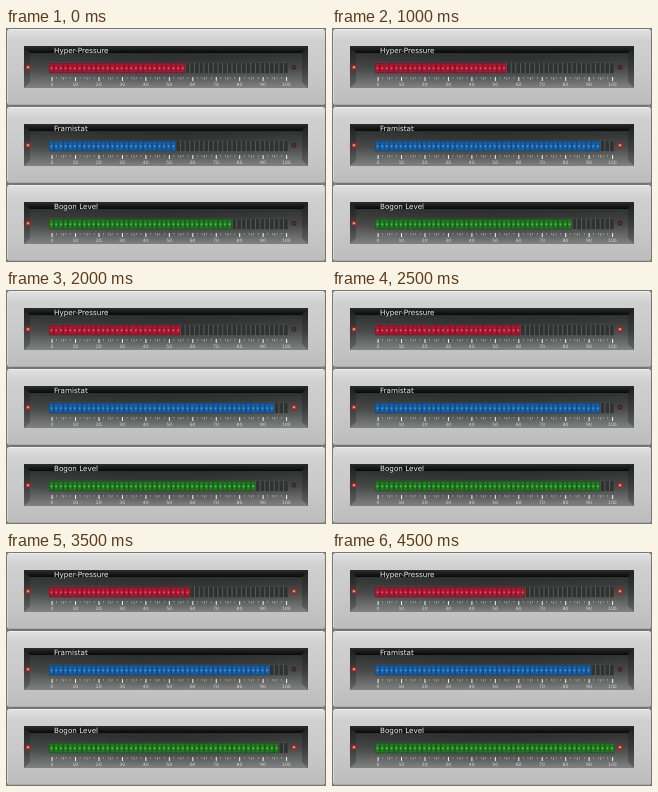
Animation, 320 px wide and 234 px high, one loop 5 s. Source, as an HTML page:

```html
<!DOCTYPE html>
<html>
<head>
<meta charset="utf-8">
<style>
html, body { margin: 0; width: 100%; height: 100%; overflow: hidden; background: #777; }
svg { display: block; width: 320px; height: 234px; }
text { font-family: "DejaVu Sans", sans-serif; }
</style>
</head>
<body>
<svg id="stage" viewBox="0 0 320 234" xmlns="http://www.w3.org/2000/svg">
  <defs>
    <linearGradient id="metal" x2="0" y2="1">
      <stop offset="0" stop-color="#e2e2e2"/>
      <stop offset=".16" stop-color="#d0d0d0"/>
      <stop offset=".6" stop-color="#c8c8c8"/>
      <stop offset="1" stop-color="#bcbcbc"/>
    </linearGradient>
    <linearGradient id="well" x2="0" y2="1">
      <stop offset="0" stop-color="#222423"/>
      <stop offset=".2" stop-color="#323433"/>
      <stop offset=".55" stop-color="#4a4c4b"/>
      <stop offset="1" stop-color="#808281"/>
    </linearGradient>
    <linearGradient id="lip" x2="0" y2="1">
      <stop offset="0" stop-color="#2c2e2d"/>
      <stop offset="1" stop-color="#080908"/>
    </linearGradient>
    <radialGradient id="shade">
      <stop offset="0" stop-color="#000" stop-opacity=".25"/>
      <stop offset="1" stop-color="#000" stop-opacity="0"/>
    </radialGradient>
    <radialGradient id="glow">
      <stop offset="0" stop-color="#e85040" stop-opacity=".5"/>
      <stop offset=".5" stop-color="#b03028" stop-opacity=".2"/>
      <stop offset="1" stop-color="#a01010" stop-opacity="0"/>
    </radialGradient>
  </defs>
</svg>
<script>
const STEP = 500, STEPS = 10, ROW = 78;
// one cell per two units of the scale
const UNIT = 2.345, CELLS = 51, PITCH = 2 * UNIT, LEFT = 43.6;

// lit cells per step, and the right lamp by step
const gauges = [
  { name: 'Hyper-Pressure', fill: '#b01430', edge: '#741022', dot: '#e2506a',
    lit: [29, 29, 28, 28, 28, 31, 30, 30, 31, 32],
    alarm: k => k % 2 === 1 },
  { name: 'Framistat', fill: '#1260ac', edge: '#0c4078', dot: '#4492d8',
    lit: [27, 47, 48, 48, 48, 48, 47, 47, 46, 46],
    alarm: k => k > 0 && k % 2 === 0 },
  { name: 'Bogon Level', fill: '#1f7c1e', edge: '#125012', dot: '#56b84e',
    lit: [39, 38, 42, 43, 44, 48, 48, 49, 50, 51],
    alarm: k => k % 2 === 1 }
];

const stage = document.getElementById('stage');

function add(parent, tag, attrs, text) {
  const el = document.createElementNS(stage.namespaceURI, tag);
  for (const key in attrs) el.setAttribute(key, attrs[key]);
  if (text !== undefined) el.textContent = text;
  parent.appendChild(el);
  return el;
}

const rect = (p, x, y, width, height, fill, more) =>
  add(p, 'rect', { x, y, width, height, fill, ...more });
const path = (p, d, fill, more) => add(p, 'path', { d, fill, ...more });
const disc = (p, cx, cy, r, fill) => add(p, 'circle', { cx, cy, r, fill });

function lamp(p, x) {
  disc(p, x, 39.3, 2.4, '#2e2422');
  disc(p, x, 39.3, 1.4, '#6a2a22');
  const on = add(p, 'g', {});
  disc(on, x, 39.3, 6, 'url(#glow)');
  disc(on, x, 39.3, 1.9, '#c8483c');
  disc(on, x, 39.1, .9, '#f4b0a4');
  return on;
}

function drawCase(p) {
  rect(p, 0, 0, 320, ROW, '#777');
  rect(p, .5, .5, 319, 77, 'url(#metal)', { rx: 3, stroke: '#747474' });
  path(p, 'M3 1.5H317', 'none', { stroke: '#f0f0f0' });
  path(p, 'M1.5 3V75', 'none', { stroke: '#e2e2e2', 'stroke-width': .7 });
  path(p, 'M3 76.5H317', 'none', { stroke: '#a8a8a8', 'stroke-width': .8 });
  rect(p, 18, 18, 284, 42, 'url(#well)');
  rect(p, 18, 18, 284, 42, 'url(#shade)');
  path(p, 'M18 18L24 25V54L18 60Z', '#111', { opacity: .25 });
  path(p, 'M302 18L296 25V54L302 60Z', '#111', { opacity: .25 });
  path(p, 'M18 18H302L296 25H24Z', 'url(#lip)');
}

function drawScale(p) {
  for (let v = 0; v <= 100; v++) {
    if (v % 2 && v % 5) continue;
    const major = v % 10 === 0, mid = v % 5 === 0;
    rect(p, 45.6 + v * UNIT, 49, major ? 1 : .6, major ? 4 : mid ? 3 : 1.8,
      major ? '#f0f0f0' : '#b8b8b8');
    if (major) add(p, 'text', { x: 45.9 + v * UNIT, y: 58.2, fill: '#d4d4d4',
      'font-size': 4.6, 'text-anchor': 'middle' }, v);
  }
}

function build(gauge, row) {
  const p = add(stage, 'g', { transform: `translate(0 ${row * ROW})` });
  drawCase(p);
  add(p, 'text', { x: 48, y: 24.8, fill: '#f2f2f2', 'font-size': 7.2 }, gauge.name);
  rect(p, LEFT - .6, 34.8, CELLS * PITCH, 10.6, '#5a5c5b');
  gauge.cells = [];
  for (let i = 0; i < CELLS; i++) {
    const x = LEFT + i * PITCH;
    rect(p, x, 35, 3.7, 10.2, '#303231');
    const cell = add(p, 'g', {});
    rect(cell, x - .3, 35, 4.3, 10.2, gauge.edge);
    rect(cell, x + .1, 35.6, 3.5, 9, gauge.fill);
    disc(cell, x + 1.85, 40.3, 1.1, gauge.dot);
    gauge.cells.push(cell);
  }
  drawScale(p);
  lamp(p, 22);
  gauge.lamp = lamp(p, 288);
}

const show = (el, on) => el.setAttribute('visibility', on ? 'visible' : 'hidden');

function render(time) {
  const k = Math.floor(time / STEP) % STEPS;
  for (const g of gauges) {
    g.cells.forEach((cell, i) => show(cell, i < g.lit[k]));
    show(g.lamp, g.alarm(k));
  }
}

gauges.forEach(build);
render(0);
const start = performance.now();
function tick() {
  render(performance.now() - start);
  requestAnimationFrame(tick);
}
requestAnimationFrame(tick);
</script>
</body>
</html>
```
